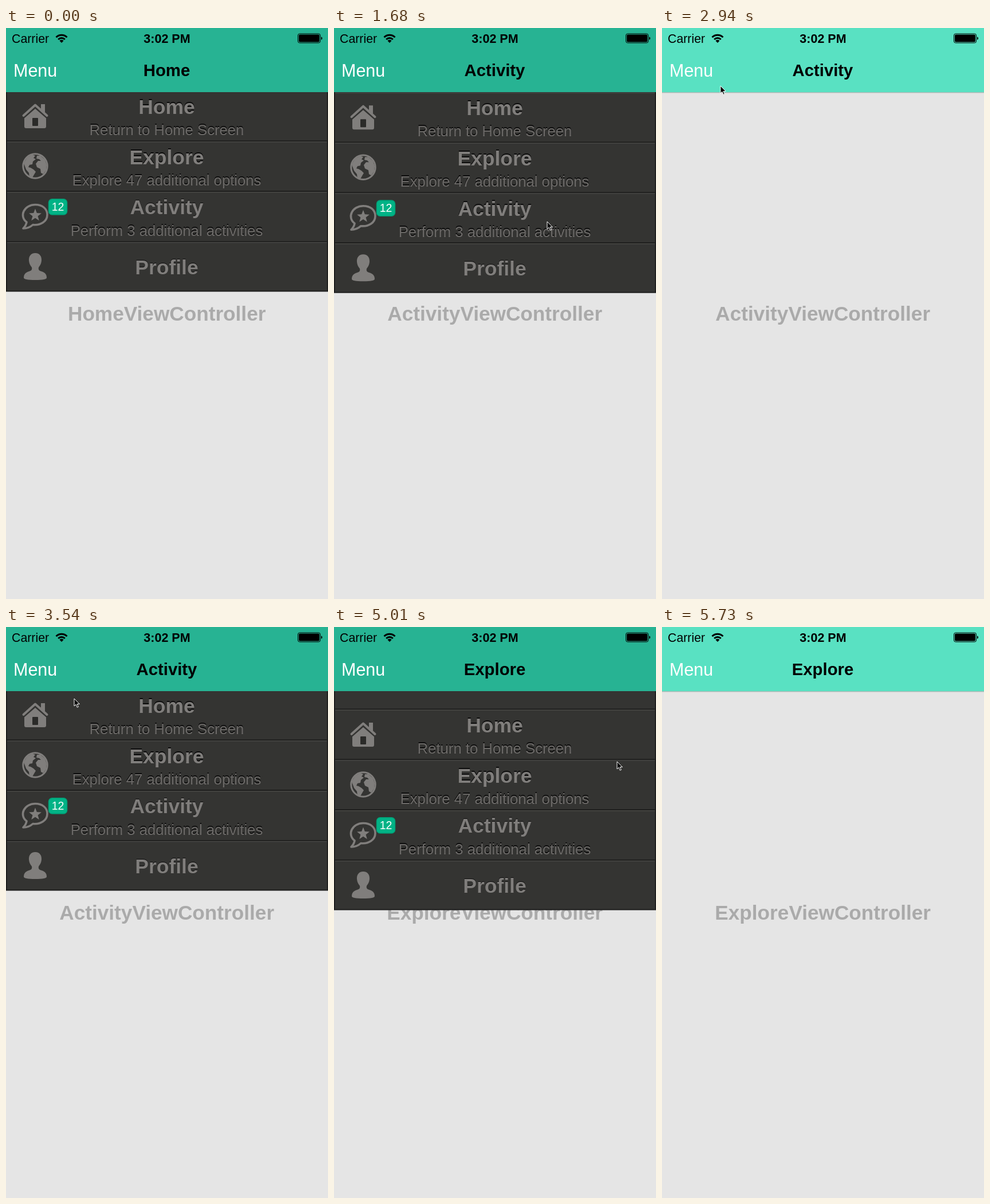
An HTML page that plays this animation: 562 px wide and 997 px high, repeating every 6140 ms.

```html
<!DOCTYPE html>
<html lang="en">
<head>
<meta charset="utf-8">
<title>Drop-down menu</title>
<style>
  html, body { margin: 0; width: 100%; height: 100%; overflow: hidden; background: #e5e5e5; }
  svg { display: block; width: 100vw; height: 100vh; }
  text { font-family: "Liberation Sans", Arial, sans-serif; }
  .mid { text-anchor: middle; }
  .bold { font-weight: bold; }
  .name { font-size: 35.5px; font-weight: bold; fill: #807e7c; }
  .note { font-size: 25.7px; fill: #6c6a68; }
  .shade { fill: #0c0c0c; }
  .icon { fill: #807e7c; }
  .line { fill: none; stroke: #807e7c; stroke-width: 3.6; stroke-linejoin: round; stroke-linecap: round; }
</style>
</head>
<body>
<svg viewBox="0 0 562 997" preserveAspectRatio="none">
  <defs>
    <clipPath id="below"><rect y="112" width="562" height="885"/></clipPath>
    <clipPath id="above"><rect width="562" height="112"/></clipPath>
    <linearGradient id="fade" x2="0" y2="1">
      <stop offset=".93" stop-color="#27b393"/>
      <stop offset="1" stop-color="#27b393" stop-opacity="0"/>
    </linearGradient>
  </defs>
  <rect width="562" height="997" fill="#e5e5e5"/>
  <text id="label" class="mid bold" x="280.700" y="511" font-size="35.200" fill="#aaa"></text>

  <rect width="562" height="112.400" fill="#59e1c2"/>
  <rect y="112.400" width="562" height=".9" fill="#a0a0a0"/>
  <g clip-path="url(#above)"><rect id="tint" y="-90" width="562" height="550" fill="url(#fade)"/></g>

  <g clip-path="url(#below)"><g id="menu">
    <rect y="-90" width="562" height="550.300" fill="#343432"/>
    <rect id="press" x="2" width="558" height="86" fill="#1c1c1b"/>
    <g id="rows"></g>
    <path d="M.9-90V459.400H561.1V-90" fill="none" stroke="#1f1f1e" stroke-width="1.8"/>

    <path class="line" style="stroke-width:4" d="M30.500 153L51 134.500 71.500 153"/>
    <path class="icon" d="M61 133h7v15l-7-6zM51 141L70 157.500V172q0 3-3 3H35q-3 0-3-3V157.500z"/>
    <rect x="46" y="157" width="10" height="14" rx="1" fill="#2b2b29"/>

    <circle class="line" style="stroke-width:3" cx="51" cy="241" r="21.200"/>
    <path class="icon" d="M31 236l6-10 9-5 5 2-3 4 4 2-5 4-1 5-5 1-2 4 4 1 5 3 4 4-3 5-4 7-4-2-1-8-5-6zM54 223l6 0 8 7 3 9-1 9-5 7-4-2-1-7-6-3-2-6 4-5 5 0-3-3-5-1z"/>

    <path class="line" d="M36 339C22 328 32 308.500 51 308.500C64 308.500 72 316 72 326C72 338 60 345 47 343.500C42 348 36 350 30 350Q35 345 36 339z"/>
    <path id="star" class="icon"/>

    <path class="icon" d="M51 393c8 0 11.500 6 11 13c-.5 6-3 9-5 12c-1 4 1 6 5 7c6 2 9 5 9 11q0 4-20 4t-20-4c0-6 3-9 9-11c4-1 6-3 5-7c-2-3-4.500-6-5-12c-.5-7 3-13 11-13z"/>

    <rect x="74.500" y="298.700" width="32" height="27.300" rx="6" fill="#00b386" stroke="#009f76" stroke-width="1.500"/>
    <text class="mid" x="90.500" y="319" font-size="19.500" fill="#fff">12</text>
  </g></g>

  <text x="10" y="25.700" font-size="21.300">Carrier</text>
  <path d="M87.500 16.200a13.400 13.400 0 0 1 19 0M91.200 20a8.200 8.200 0 0 1 11.600 0" fill="none" stroke="#000" stroke-width="3"/>
  <path d="M97 26l-3.500-3.700a5 5 0 0 1 7 0z"/>
  <text class="mid bold" x="281" y="25.700" font-size="21.500">3:02 PM</text>
  <rect x="509.500" y="10" width="39" height="16" rx="3" fill="none" stroke="#000"/>
  <rect x="511" y="11.500" width="36" height="13" rx="1.800"/>
  <path d="M550 15.300q2 .7 2 2.700t-2 2.700z"/>
  <text x="13" y="84.500" font-size="30.500" fill="#fff">Menu</text>
  <text id="title" class="mid bold" x="280.500" y="84.300" font-size="29.300"></text>

  <path id="cursor" d="M0 0V13L3 10.300 5.200 15.300 7.300 14.400 5.100 9.500H9.300z" fill="#000" stroke="#fff"/>
</svg>
<script>
const LOOP = 6140, PITCH = 87.8, HIDDEN = -460, BOUNCE = 35, DIP = 211, SLIDE = 300;
const CLOSE_1 = 1648, OPEN = 3240, CLOSE_2 = 4791;
const $ = id => document.getElementById(id);

const items = [
  ["Home", "Return to Home Screen"],
  ["Explore", "Explore 47 additional options"],
  ["Activity", "Perform 3 additional activities"],
  ["Profile"],
];

// Text with a dark copy just above it, for an engraved look
const word = (kind, text, y) => `<text class="mid ${kind}" x="280.5" y="${y}">${text}</text>`;
const engraved = (kind, text, y) => word(kind + " shade", text, y - 1.7) + word(kind, text, y);

$("rows").innerHTML = items.map(([name, note], i) => {
  const y = 109.5 + PITCH * i;
  return `<rect y="${y - 0.9}" width="562" height="1.8" fill="#1c1c1b"/>
    <rect x="1.8" y="${y + 0.9}" width="558.4" height="1.5" fill="#484845"/>` +
    engraved("name", name, y + (note ? 40.3 : 57.3)) +
    (note ? engraved("note", note, y + 77.5) : "");
}).join("");

$("star").setAttribute("d", "M" + Array.from({ length: 10 }, (_, i) => {
  const r = i % 2 ? 4.8 : 11.5, a = i * Math.PI / 5;
  return [51 + r * Math.sin(a), 327 - r * Math.cos(a)];
}).join("L") + "z");

// Pointer path: time, x, y
const path = [
  [540, 517, 366], [1020, 372, 338], [2590, 372, 338], [2940, 102, 101],
  [3240, 62, 76], [3300, 62, 76], [3540, 119, 125], [3900, 412, 234],
  [4080, 494, 235], [5010, 494, 235], [5250, 516, 567], [5700, 543, 997],
];

const ease = x => { x = Math.min(1, Math.max(0, x)); return x * x * (3 - 2 * x); };

// Dip down first, then slide up behind the bar
const closing = t => BOUNCE * ease(t / DIP) + (HIDDEN - BOUNCE) * ease((t - DIP) / SLIDE);

function menuOffset(t) {
  if (t < OPEN) return closing(t - CLOSE_1);
  if (t < CLOSE_2) return HIDDEN * (1 - ease((t - OPEN) / SLIDE));
  return closing(t - CLOSE_2);
}

function pointer(t) {
  const i = path.findIndex(p => p[0] > t);
  if (i < 1) return null;
  const [t0, x0, y0] = path[i - 1], [t1, x1, y1] = path[i];
  const k = (t - t0) / (t1 - t0);
  return [x0 + (x1 - x0) * k, y0 + (y1 - y0) * k];
}

// The picture advances in 60 ms steps, half a step late while the menu closes
function stepped(t) {
  const late = (t >= 1770 && t < 2130) || t >= 4770 ? 30 : 0;
  return Math.floor((t - late) / 60) * 60 + late;
}

function draw(now) {
  const t = stepped(now % LOOP);
  const shift = `translate(0 ${menuOffset(t).toFixed(1)})`;
  $("menu").setAttribute("transform", shift);
  $("tint").setAttribute("transform", shift);

  const page = t < CLOSE_1 ? "Home" : t < CLOSE_2 ? "Activity" : "Explore";
  $("title").textContent = page;
  $("label").textContent = page + "ViewController";

  const row = t >= 1380 && t < CLOSE_1 ? 2 : t >= 4680 && t < CLOSE_2 ? 1 : -1;
  $("press").style.display = row < 0 ? "none" : "";
  $("press").setAttribute("y", 110.4 + PITCH * row);

  const at = pointer(t);
  $("cursor").style.display = at ? "" : "none";
  if (at) $("cursor").setAttribute("transform", `translate(${at[0].toFixed(1)} ${at[1].toFixed(1)})`);
}

const start = performance.now();
function tick() {
  draw(performance.now() - start);
  requestAnimationFrame(tick);
}
tick();
</script>
</body>
</html>
```
